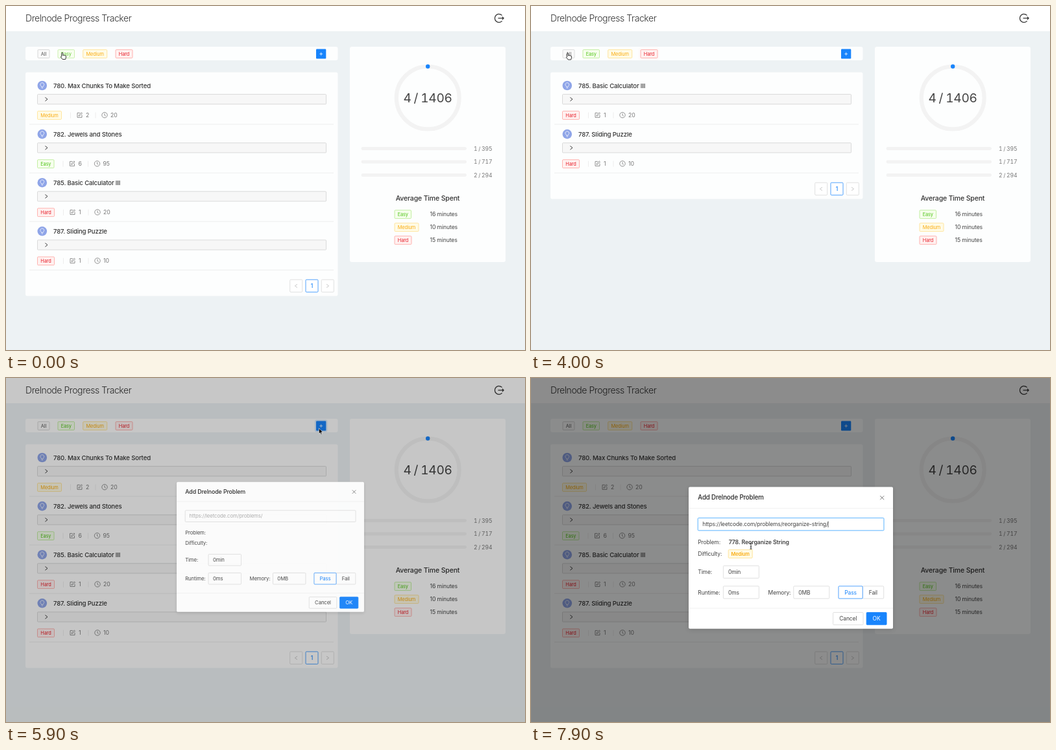
An HTML page for the animation above (8000 ms loop, 800 by 532 pixels).

```html
<!DOCTYPE html>
<html lang="en">
<head>
<meta charset="utf-8">
<title>Progress Tracker</title>
<style>
  html, body { margin: 0; width: 100%; height: 100%; overflow: hidden; background: #edf2f4; }
  svg { display: block; width: 800px; height: 532px; }
  text { font-family: Inter, "Open Sans", sans-serif; letter-spacing: -.015em; white-space: pre; }
  .count { font-variant-numeric: tabular-nums; word-spacing: -.04em; }
</style>
</head>
<body>
<svg id="stage" viewBox="0 0 800 532"></svg>
<script>
const DURATION = 8000, STEP = 100;
const BLUE = '#1884fc', LINE = '#d6d6d6', INK = '#444', GRAY = '#777';
const stage = document.getElementById('stage');

// Per level: text, background, border, tag width
const LEVELS = {
  All: ['#555', '#fafafa', '#cbcbcb', 18],
  Easy: ['#52c41a', '#f6ffed', '#b0e887', 25.5],
  Medium: ['#faad14', '#fffbe6', '#ffde85', 37],
  Hard: ['#e8222d', '#fff1f0', '#ff9d98', 26]
};
const PROBLEMS = [
  ['780. Max Chunks To Make Sorted', 'Medium', 2, 20],
  ['782. Jewels and Stones', 'Easy', 6, 95],
  ['785. Basic Calculator III', 'Hard', 1, 20],
  ['787. Sliding Puzzle', 'Hard', 1, 10]
];
const FILTERS = [['All', 49], ['Easy', 80], ['Medium', 118.7], ['Hard', 169]];
const VIEWS = [[0, 'All'], [1400, 'Easy'], [2200, 'Medium'], [3500, 'Hard'], [4500, 'All']];
const CLICKS = { All: 4200, Easy: 1300, Medium: 2000, Hard: 3200, plus: 5800 };
const OPEN = 5900, FOCUS = 7600, PASTE = 7700, FOUND = 7900;
const POINTER = [
  [0, 87, 72.5], [200, 87, 71], [1500, 87, 71], [1900, 137, 72], [2400, 137, 72],
  [2900, 179, 72.5], [3400, 179, 72.5], [4000, 57, 73], [4300, 57, 73], [4900, 376, 120],
  [5000, 376, 120], [5600, 482.4, 77.7], [7400, 482.4, 77.7], [7600, 339, 226], [7700, 339, 226], [7900, 339, 260]
];

const clamp = v => Math.max(0, Math.min(1, v));
const smooth = v => v * v * (3 - 2 * v);

const box = (x, y, w, h, fill, stroke = 'none', r = 1.2, extra = '') =>
  `<rect x="${x}" y="${y}" width="${w}" height="${h}" rx="${r}" fill="${fill}" stroke="${stroke}" stroke-width=".75" ${extra}/>`;
const text = (x, y, s, size = 8.5, fill = INK, extra = '') =>
  `<text x="${x}" y="${y}" font-size="${size}" fill="${fill}" ${extra}>${s}</text>`;
const middle = (x, y, s, size, fill, extra = '') => text(x, y, s, size, fill, `text-anchor="middle" ${extra}`);
const path = (d, stroke, width = .8, fill = 'none') =>
  `<path d="${d}" fill="${fill}" stroke="${stroke}" stroke-width="${width}" stroke-linejoin="round"/>`;
const at = (x, y, s) => `<g transform="translate(${x} ${y})">${s}</g>`;
const fade = (opacity, s) => `<g opacity="${opacity}">${s}</g>`;

function tag(x, cy, level, weight = 400, [ink, fill, border] = LEVELS[level]) {
  const w = LEVELS[level][3];
  return box(x, cy - 6.4, w, 12.8, fill, border) +
    middle(x + w / 2, cy + 2.6, level, 7.4, ink, `font-weight="${weight}"`);
}

function wave(t, click, x, y, w, h, color) {
  const age = t - click;
  if (age < 0 || age > 2000) return '';
  const d = 3.6 * (1 - (1 - clamp(age / 400)) ** 3);
  return fade(.2 * (1 - age / 2000) ** 4, box(x - d, y - d, w + 2 * d, h + 2 * d, color, 'none', 1 + d));
}

function pointerAt(t) {
  const i = POINTER.findIndex(k => k[0] > t);
  if (i < 0) return POINTER.at(-1).slice(1);
  const [a, b] = [POINTER[i - 1], POINTER[i]];
  const k = smooth((t - a[0]) / (b[0] - a[0]));
  return [a[1] + (b[1] - a[1]) * k, a[2] + (b[2] - a[2]) * k];
}

function header() {
  return box(0, 0, 800, 39, '#fff', 'none', 0) +
    text(30, 24, 'Drelnode Progress Tracker', 14, '#333', 'font-weight="300" style="letter-spacing:-.03em"') +
    path('M764.6 14.6A6.4 6.4 0 1 0 764.6 23.2M758.5 18.9H767M764.9 16.8L767.2 18.9L764.9 21', '#333', 1.25);
}

function filters(t, hovered) {
  let s = box(30, 63, 481.5, 21, '#fdfefe', 'none', 3);
  for (const [level, x] of FILTERS) {
    const [, , border, w] = LEVELS[level];
    s += wave(t, CLICKS[level], x, 67.5, w, 13, border) + fade(hovered === level ? .85 : 1, tag(x, 74, level));
  }
  return s + wave(t, CLICKS.plus, 478, 66.5, 15.3, 15, BLUE) +
    box(478, 66.5, 15.3, 15, hovered === 'plus' ? '#40a0ff' : BLUE) +
    path('M483.3 74.1H488.1M485.7 71.7V76.5', '#fff', .8);
}

const rowsOf = view => PROBLEMS.filter(p => view === 'All' || p[1] === view);

function row([title, level, tries, minutes], oldLevel, blend) {
  const r = 48.5 + LEVELS[level][3];
  const chip = blend < 1 && oldLevel
    ? tag(48.5, 169, level, 400, LEVELS[oldLevel]) + fade(blend, tag(48.5, 169, level))
    : tag(48.5, 169, level);
  return '<circle cx="55.8" cy="123" r="7.3" fill="#8fa5e8"/>' +
    path('M54.5 125.2V124.2A2.9 2.9 0 1 1 57.1 124.2V125.2ZM54.7 126.9H56.9', '#fff', .75) +
    text(73, 126.6, title, 9.6, '#333', 'font-weight="500"') +
    box(48.5, 136.6, 445, 15.2, '#f7f7f7', '#cfcfcf', 1) +
    path('M60.4 141.4L64 144.2L60.4 147', '#333', .95) + chip +
    path(`M${r + 14} 164.5V173.5M${r + 52.5} 164.5V173.5`, '#e6e6e6', .7) +
    at(r + 28, 168.7, path('M.4 -3.4H-3.5V3.6H3.5V-.2M-1.4 1.5L-1 -.2L2.8 -4L4 -2.8L.3 1Z', GRAY)) +
    text(r + 37.5, 171.8, tries, 8.7, GRAY) +
    at(r + 66.5, 168.7, '<circle r="4.2" fill="none" stroke="#777" stroke-width=".8"/>' + path('M0 -2.5V.3L1.8 1.5', GRAY)) +
    text(r + 75.5, 171.8, minutes, 8.7, GRAY) +
    path('M36 183H505', '#e6e6e6', .7);
}

function list(t) {
  const i = VIEWS.findLastIndex(v => v[0] <= t);
  const rows = rowsOf(VIEWS[i][1]);
  const before = i ? rowsOf(VIEWS[i - 1][1]) : [];
  const blend = clamp((t - VIEWS[i][0]) / 300);
  const bottom = 148.5 + 75 * rows.length, y = bottom - 25.3, mid = bottom - 15.6;
  return box(30, 102.5, 481.5, bottom - 102.5, '#fdfefe', 'none', 3) +
    rows.map((p, n) => at(0, 75.1 * n, row(p, before[n]?.[1], blend))).join('') +
    [437.7, 462, 486.3].map((x, n) => box(x, y, 19, 19.2, '#fff', n === 1 ? BLUE : LINE)).join('') +
    path(`M449 ${mid - 2.6}L445.4 ${mid}L449 ${mid + 2.6}M494 ${mid - 2.6}L497.6 ${mid}L494 ${mid + 2.6}`, '#bbb') +
    middle(471.5, mid + 3, '1', 8.5, BLUE, 'font-weight="500"');
}

function stats() {
  const counts = ['1 / 395', '1 / 717', '2 / 294'];
  const averages = [['Easy', 16], ['Medium', 10], ['Hard', 15]];
  return box(530, 63, 240, 333, '#fdfefe', 'none', 3) +
    '<circle cx="650.2" cy="142" r="48.4" fill="none" stroke="#f3f3f3" stroke-width="6.2"/>' +
    `<circle cx="650.2" cy="93.5" r="3.2" fill="${BLUE}"/>` +
    middle(650, 148.9, '4 / 1406', 19.1, INK, 'class="count"') +
    counts.map((s, i) => box(547.5, 218.1 + 20.5 * i, 162.5, 4.8, '#f3f3f3', 'none', 2.4) +
      text(721, 223.5 + 20.5 * i, s, 8.6, GRAY, 'class="count"')).join('') +
    middle(650, 301, 'Average Time Spent', 10.5, '#333', 'font-weight="500"') +
    averages.map(([level, n], i) => tag(599, 322.2 + 20 * i, level) +
      text(653.5, 325 + 20 * i, n + ' minutes', 8.7, INK)).join('');
}

function modal(t) {
  const decay = .157 ** ((t - OPEN) / 100);
  const focus = t >= FOCUS, pasted = t >= PASTE, found = t >= FOUND;
  const field = (x, y, value) => box(x, y, 55, 19.2, '#fff', LINE) + text(x + 7.5, y + 12.7, value);
  const button = (x, y, w, label, ink = INK, fill = '#fff', border = LINE) =>
    box(x, y, w, 19.2, fill, border) + middle(x + w / 2, y + 12.6, label, 8.5, ink);
  const body =
    box(243, 168.5, 315, 219.3, '#fff', 'none', 2, 'style="filter:drop-shadow(0 2px 3px rgba(0,0,0,.12))"') +
    text(257.3, 188.4, 'Add Drelnode Problem', 9.7, '#262626', 'font-weight="500"') +
    path('M538.2 182.2L544.2 188.2M544.2 182.2L538.2 188.2', '#5c5c5c') +
    path('M243 201.6H558M243 356H558', '#ebebeb', .7) +
    (focus ? box(256.6, 215.8, 288, 20.8, '#cfe8ff', 'none', 2) : '') +
    box(257.3, 216.5, 286.6, 19.3, '#fff', focus ? '#40a9ff' : LINE) +
    text(264.3, 229.1, 'https://leetcode.com/problems/' + (pasted ? 'reorganize-string/' : ''), 8.5,
      pasted ? INK : '#aeaeae', 'id="url"') +
    (focus ? '<path id="caret" d="M0 221.5V231" stroke="#333" stroke-width=".7"/>' : '') +
    text(257.3, 256.6, 'Problem:') + text(257.3, 274.8, 'Difficulty:') +
    (found ? text(304.7, 256.6, '778. Reorganize String', 8.8, INK, 'font-weight="600"') + tag(304.2, 272, 'Medium', 600) : '') +
    text(257.3, 303, 'Time:') + field(296.4, 290.4, '0min') +
    text(257.3, 334.7, 'Runtime:') + field(296.4, 321.9, '0ms') +
    text(365.6, 334.7, 'Memory:') + field(404.8, 321.9, '0MB') +
    button(511, 321.9, 32.7, 'Fail') + button(474, 321.9, 37.2, 'Pass', BLUE, '#fff', BLUE) +
    button(465.6, 362.5, 46.4, 'Cancel') + button(517.1, 362.5, 31, 'OK', '#fff', BLUE, BLUE);
  // Grows out of the button that opened it
  return `<g opacity="${1 - .06 * decay}" transform="translate(485 75) scale(${1 - .083 * decay}) translate(-485 -75)">${body}</g>`;
}

function cursor(t, x, y, hovered) {
  if (t >= FOCUS) return at(x, y, path('M-1.5 -4.6Q0 -4.6 0 -3.6Q0 -4.6 1.5 -4.6M0 -3.8V3.8M-1.5 4.6Q0 4.6 0 3.6Q0 4.6 1.5 4.6M-1 1H1', '#222', .9));
  if (hovered) return at(x, y, path('M-1.2 5.6V.8a1 1 0 0 1 2 0V4a.9.9 0 0 1 1.6 0a.9.9 0 0 1 1.6.4a.8.8 0 0 1 1.4.4V7.4L4.6 10H.2L-2.6 6.4a.9.9 0 0 1 1.4-.8z', '#111', .85, '#fff'));
  return at(x, y, path('M0 0V8.6L2 6.8L3.3 9.8L4.7 9.2L3.4 6.3H6z', '#fff', .6, '#000'));
}

function hoverTarget(t, x, y) {
  if (t >= OPEN || y < 66.5 || y > 81.5) return null;
  if (x > 478 && x < 493.5) return 'plus';
  return FILTERS.find(([level, left]) => x >= left && x <= left + LEVELS[level][3])?.[0];
}

function render(t) {
  const [x, y] = pointerAt(t);
  const hovered = hoverTarget(t, x, y);
  let s = box(0, 0, 800, 532, '#edf2f4', 'none', 0) + header() + filters(t, hovered) + list(t) + stats();
  if (t >= OPEN) {
    s += box(0, 0, 800, 532, '#000', 'none', 0, `fill-opacity="${t > OPEN ? .45 : .22}"`) + modal(t);
  }
  stage.innerHTML = s + cursor(t, x, y, hovered);
  const caret = document.getElementById('caret');
  if (caret) {
    const end = t >= PASTE ? document.getElementById('url').getComputedTextLength() : 0;
    caret.setAttribute('transform', `translate(${264.5 + end} 0)`);
  }
}

const start = performance.now();
let shown = -1;
function tick() {
  const t = Math.floor(((performance.now() - start) % DURATION) / STEP) * STEP;
  if (t !== shown) render(shown = t);
  requestAnimationFrame(tick);
}
tick();
</script>
</body>
</html>
```
